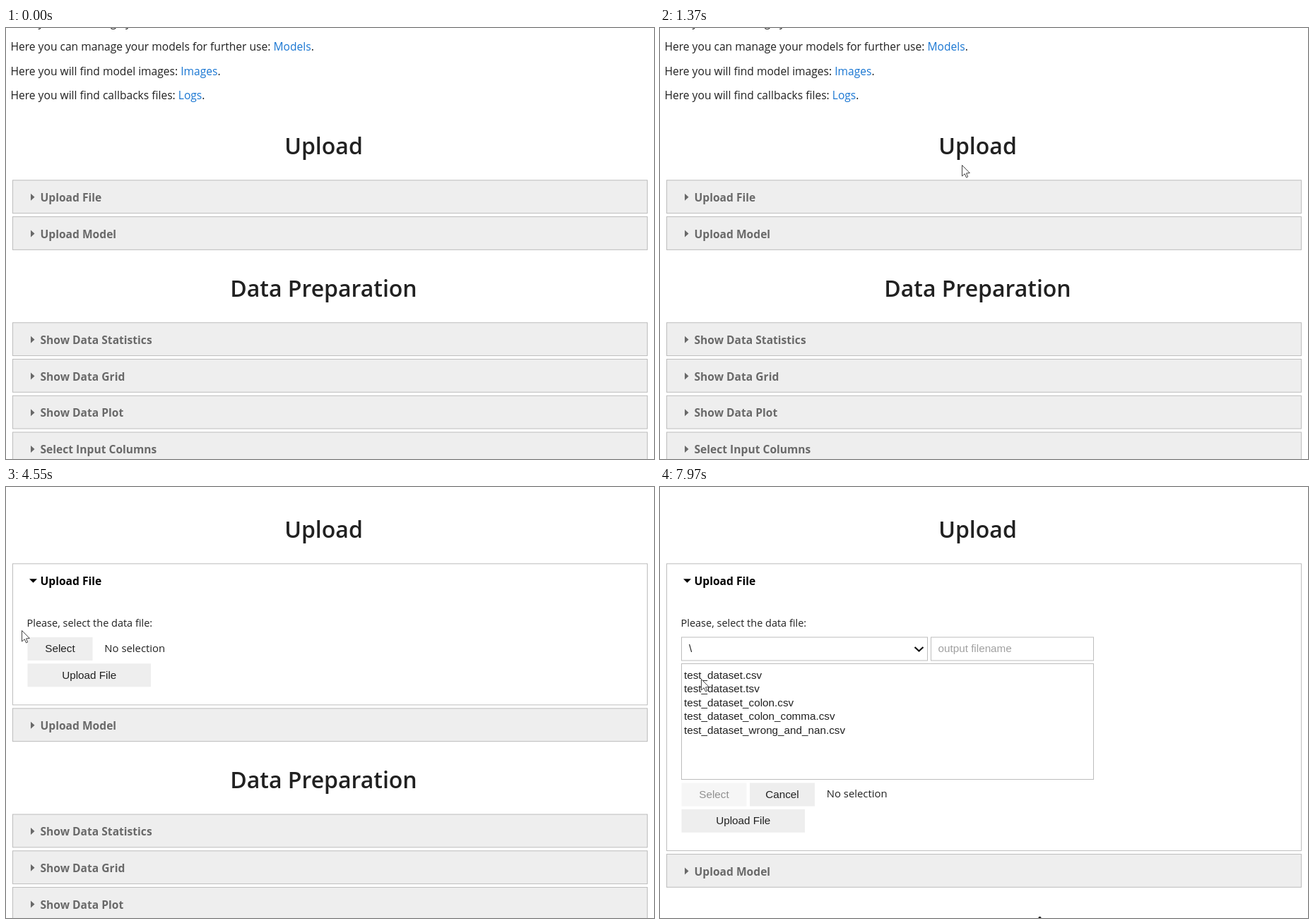
An HTML page with a canvas that plays this animation: 917 px wide and 611 px high, repeating every 8000 ms.

```html
<!DOCTYPE html>
<html lang="en">
<head>
<meta charset="utf-8">
<title>Upload and data preparation</title>
<style>
html, body { margin: 0; width: 100%; height: 100%; overflow: hidden; background: #fff; }
canvas { display: block; }
</style>
</head>
<body>
<canvas id="stage" width="917" height="611"></canvas>
<script>
const ctx = document.getElementById('stage').getContext('2d');
const LOOP = 8000, STEP = 68.7;
const SANS = '"Open Sans", "Noto Sans", sans-serif';
const ARIAL = '"Liberation Sans", Arial, sans-serif';
const FONT = {
  body: `15.6px ${SANS}`,
  title: `600 32px ${SANS}`,
  label: `bold 15.6px ${SANS}`,
  hint: `14.5px ${SANS}`,
  status: `14.9px ${SANS}`,
  ui: `15.25px ${ARIAL}`
};
const INK = '#212121', GREY = '#696969', LINE = '#bdbdbd', LINK = '#1976d2';
const OPEN_AT = 3170, PRESS_AT = 6470, DIALOG_AT = 6600;
const BAR = 46.8, GAP = 4.95;
const INTRO = [
  ['manage your data files', 'Data'],
  ['manage your models for further use', 'Models'],
  ['find model images', 'Images'],
  ['find callbacks files', 'Logs']
];
const FILES = ['.csv', '.tsv', '_colon.csv', '_colon_comma.csv', '_wrong_and_nan.csv'];

// the pointer enters, circles the heading, then glides: start, end, x, y
const CIRCLE_AT = 824, CIRCLE_END = 1900;
const GLIDES = [
  [CIRCLE_END, 2473, 161, 215], [2500, 2690, 126, 220], [2960, 3030, 141, 228],
  [3200, 3440, 141, 244], [3700, 3920, 136, 236], [3990, 4534, 22, 203],
  [4540, 5390, 220, 199], [5780, 6045, 89, 224], [6100, 6210, 97, 235],
  [7180, 7450, 122, 250], [7450, 7960, 58, 272]
];

const clamp = u => Math.min(1, Math.max(0, u));
const mix = (a, b, u) => a + (b - a) * u;
const smooth = u => u * u * (3 - 2 * u);

function circle(t) {
  const a = (40 + (t - CIRCLE_AT) * 0.385) * Math.PI / 180;
  return { x: 456 + 92 * Math.cos(a), y: 157.5 - 38 * Math.sin(a) };
}

function pointer(t) {
  let p = circle(Math.min(CIRCLE_END, Math.max(CIRCLE_AT, t)));
  if (t < CIRCLE_AT) {
    const u = clamp(t / CIRCLE_AT);
    p = { x: mix(905, p.x, u), y: mix(640, p.y, 1 - (1 - u) ** 1.55) };
  }
  for (const [start, end, x, y] of GLIDES) {
    const u = smooth(clamp((t - start) / (end - start)));
    p = { x: mix(p.x, x, u), y: mix(p.y, y, u) };
  }
  return { x: Math.round(p.x), y: Math.round(p.y) };
}

function text(str, x, y, font, color = INK, align = 'left') {
  ctx.font = font;
  ctx.fillStyle = color;
  ctx.textAlign = align;
  ctx.fillText(str, x, Math.round(y));
  return x + ctx.measureText(str).width;
}

function poly(points, fill, stroke) {
  ctx.beginPath();
  points.forEach(([x, y]) => ctx.lineTo(x, y));
  ctx.closePath();
  ctx.fillStyle = fill;
  ctx.fill();
  if (stroke) {
    ctx.strokeStyle = stroke;
    ctx.lineWidth = 1;
    ctx.stroke();
  }
}

function frame(x, y, w, h, fill) {
  ctx.fillStyle = fill;
  ctx.fillRect(x, y, w, h);
  ctx.strokeStyle = LINE;
  ctx.lineWidth = 1;
  ctx.strokeRect(x, y, w, h);
}

const inside = (p, x, y, w, h) => p.x >= x && p.x < x + w && p.y >= y && p.y < y + h;

function panel(name, y, height, open, mouse) {
  const over = !open && inside(mouse, 9, y, 899, height);
  const color = open ? '#000' : over ? '#111' : GREY;
  frame(9.5, y, 898, height, open || over ? '#fff' : '#eee');
  const mid = y + 24;
  poly(open ? [[33, mid - 2.5], [44, mid - 2.5], [38.5, mid + 3]]
            : [[35, mid - 5], [40.5, mid], [35, mid + 5]], color);
  text(name, 48.5, y + 30, FONT.label, color);
}

function button(name, x, y, w, state) {
  ctx.save();
  ctx.fillStyle = { off: '#f6f6f6', down: '#bdbdbd' }[state] || '#eee';
  if (state === 'over' || state === 'down') {
    for (const blur of [5, 2]) {
      ctx.shadowColor = 'rgba(0,0,0,0.28)';
      ctx.shadowOffsetY = 1.5;
      ctx.shadowBlur = blur;
      ctx.fillRect(x, y, w, 33);
    }
  } else {
    ctx.fillRect(x, y, w, 33);
  }
  ctx.restore();
  text(name, x + w / 2, y + 21.3, FONT.ui, state === 'off' ? '#909090' : INK, 'center');
}

function picker(y) {
  frame(30.5, y, 348, 33, '#fff');
  text('\\', 41, y + 21.3, FONT.ui);
  ctx.beginPath();
  ctx.moveTo(360.5, y + 14);
  ctx.lineTo(366.5, y + 19.5);
  ctx.lineTo(372.5, y + 14);
  ctx.strokeStyle = '#111';
  ctx.lineWidth = 2.2;
  ctx.stroke();
  frame(383.5, y, 230, 33, '#fff');
  text('output filename', 393.5, y + 21.3, FONT.ui, '#a0a0a0');
  frame(30.5, y + 37.5, 583, 164, '#fff');
  FILES.forEach((end, i) => text('test_dataset' + end, 34, y + 58.6 + i * 19.6, FONT.ui));
}

function arrow({ x, y }) {
  const shape = [[0, 0], [0, 15.5], [3.7, 12.2], [6, 17.4], [8.2, 16.4], [6, 11.4], [10.8, 11]];
  poly(shape.map(([dx, dy]) => [x + dx + 0.5, y + dy + 0.5]), '#fff', '#444');
}

function intro(top) {
  INTRO.forEach(([what, link], i) => {
    const y = top - 218.3 + i * 34.5;
    const verb = what.startsWith('find') ? 'will' : 'can';
    let x = text(`Here you ${verb} ${what}: `, 6.5, y, FONT.body);
    x = text(link, x, y, FONT.body, LINK);
    text('.', x, y, FONT.body);
  });
}

function scroll(t) {
  const u = clamp((t - 3566) / 250);
  return 107 * (u < 0.5 ? 2 * u * u : 1 - 2 * (1 - u) ** 2);
}

function uploadForm(y, t, mouse) {
  const dialog = t >= DIALOG_AT;
  text('Please, select the data file:', 29.5, y - 15.5, FONT.hint);
  if (dialog) {
    picker(y);
    y += 206.5;
    button('Cancel', 127, y, 92);
  }
  const over = inside(mouse, 30, y, 92, 33);
  const state = dialog ? 'off' : t >= PRESS_AT ? 'down' : over ? 'over' : '';
  button('Upload File', 30.5, y + 37.3, 174.5);
  button('Select', 30.5, y, 92, state);
  text('No selection', dialog ? 235.7 : 139.3, y + 20.5, FONT.status);
}

function draw(t) {
  // the screen refreshes in steps; hover styles lag one step behind
  const held = Math.floor(t / STEP + 0.1) * STEP;
  const mouse = pointer(held - STEP);
  const open = t >= OPEN_AT;
  const top = 215.8 - scroll(held);
  const height = t >= DIALOG_AT ? 406.8 : open ? 200.1 : BAR;
  const next = top + height + GAP;

  ctx.fillStyle = '#fff';
  ctx.fillRect(0, 0, 917, 611);
  intro(top);
  text('Upload', 449.5, top - 37, FONT.title, INK, 'center');
  panel('Upload File', top, height, open, mouse);
  if (open) uploadForm(top + 104.2, t, mouse);
  panel('Upload Model', next, BAR, false, mouse);
  text('Data Preparation', 449.5, next + 113, FONT.title, INK, 'center');
  ['Show Data Statistics', 'Show Data Grid', 'Show Data Plot', 'Select Input Columns']
    .forEach((name, i) => panel(name, next + 150.2 + i * (BAR + GAP), BAR, false, mouse));

  if (held > 0) arrow(pointer(held));
}

function tick(now) {
  draw(now % LOOP);
  requestAnimationFrame(tick);
}
draw(0);
requestAnimationFrame(tick);
</script>
</body>
</html>
```
